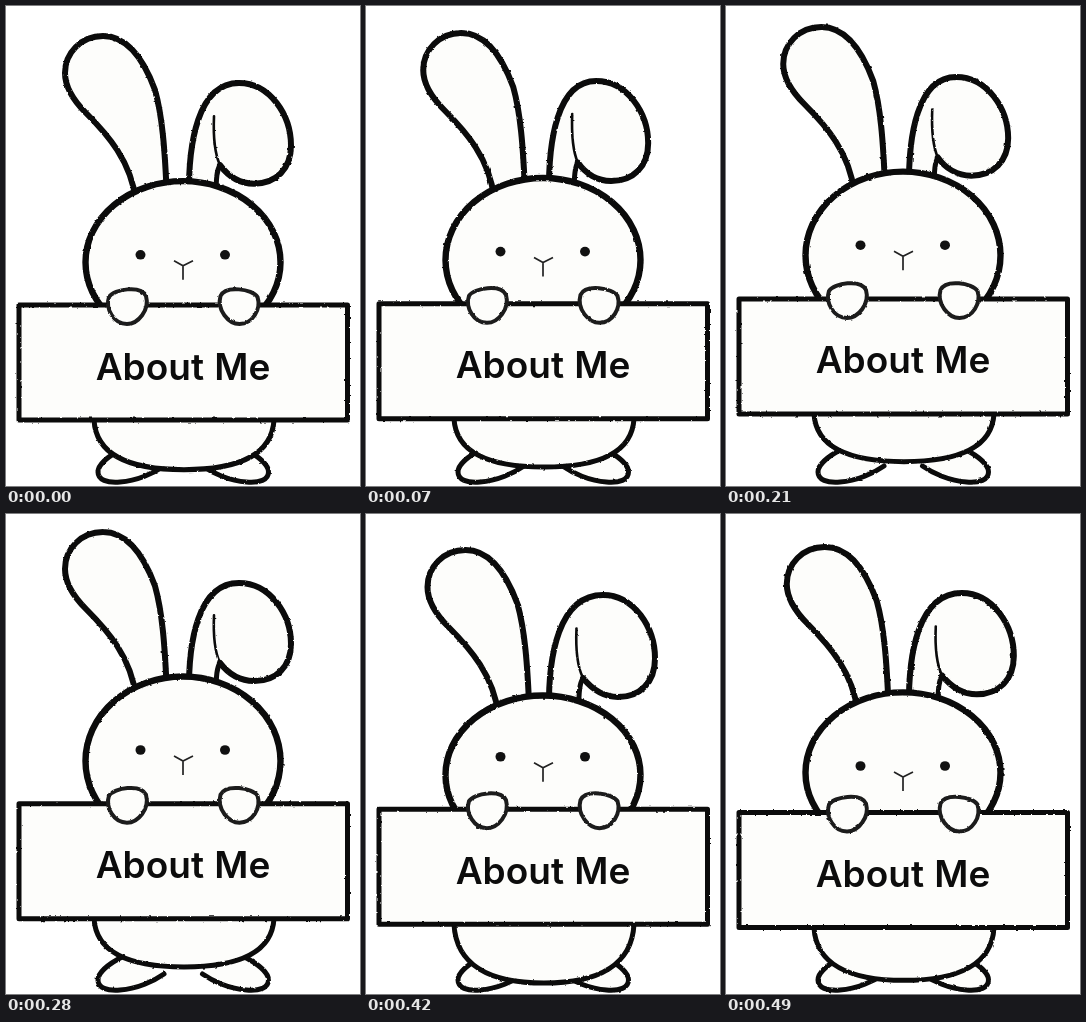
An HTML page that plays this animation: 354 by 480 pixels, repeating every 0.56 s.

```html
<!DOCTYPE html>
<html lang="en">
<head>
<meta charset="utf-8">
<title>About Me</title>
<style>
  html, body { margin: 0; width: 100%; height: 100%; overflow: hidden; background: #fff; }
  svg { display: block; width: 100vw; height: 100vh; }
  .ink { fill: #fdfdfb; stroke: #0b0b0b; stroke-width: 5; stroke-linecap: round; stroke-linejoin: round; }
  .line { fill: none; }
  .fill { stroke: none; }
  .ear { stroke-width: 6; }
  .head { stroke-width: 6.4; }
  .paw { stroke: #1c1c1c; stroke-width: 4; }
  .thin { stroke-width: 2.6; }
  .nose { fill: none; stroke: #222; stroke-width: 1.7; }
  .eye { fill: #111; }
  text { font: 600 37px Inter, sans-serif; word-spacing: 1px; fill: #0c0c0c; text-anchor: middle; }
</style>
</head>
<body>
<svg id="stage" viewBox="0 0 354 480"></svg>
<script>
const STEP = 70, COUNT = 8;
const stage = document.getElementById('stage');

// 0 at step `low`, rising to 1 at step `high`, then falling back
function swing(step, low, high, riseEase, fallEase) {
  const since = (step - low + COUNT) % COUNT;
  const rise = (high - low + COUNT) % COUNT;
  return since < rise
    ? (since / rise) ** riseEase
    : ((COUNT - since) / (COUNT - rise)) ** fallEase;
}

const path = (d, cls = '') => `<path class="${cls}" d="${d}"/>`;
const mirrored = shape => shape + `<g transform="matrix(-1 0 0 1 354.5 0)">${shape}</g>`;
const shifted = (x, y, shape) => `<g transform="translate(${x} ${y})">${shape}</g>`;

const leftEar = path(`M130 194 C125 154 102 128 80 106 C66 92 59 79 59 66 C59 46 75 29 97 29
  C121 29 138 53 149 83 C156 108 159 140 161 194`, 'ear');

function rightEar(top, bottom, sway) {
  const p = (x, y) => {
    const down = Math.min(1, (y - 74) / 103);
    const across = Math.min(1, (x - 183) / 40);
    return `${x + sway * across} ${y + top + (bottom - top) * down}`;
  };
  const rim = `M${p(183, 192)} C${p(182, 135)} ${p(192, 74)} ${p(233, 74)}
    C${p(264, 74)} ${p(285, 107)} ${p(285, 138)} C${p(285, 162)} ${p(270, 177)} ${p(248, 177)}
    C${p(234, 177)} ${p(222, 169)} ${p(214, 158)}`;
  const stem = `C${p(211, 163)} ${p(210, 170)} ${p(210, 192)}`;
  return path(rim + stem + 'Z', 'fill')
    + path(rim, 'line ear')
    + path(`M${p(214, 158)} C${p(209, 147)} ${p(207, 132)} ${p(208, 108)}`, 'line thin')
    + path(`M${p(214, 158)} ${stem}`, 'line');
}

function face(y) {
  const eye = x => `<ellipse class="eye" cx="${x}" cy="${y}" rx="5" ry="4.8"/>`;
  return eye(134.5) + eye(219)
    + path(`M168 ${y + 6} L177 ${y + 11} L187 ${y + 6} M177 ${y + 11} V${y + 25}`, 'nose');
}

function body(hem, bottom) {
  const bend = hem + (bottom - hem) * .7;
  return path(`M88 ${hem} C90 ${bend} 124 ${bottom} 178 ${bottom} S266 ${bend} 268 ${hem}`);
}

const foot = path('M118 442 C104 449 92 458 92 466 C92 474 101 477 114 476 C131 475 148 467 158 460');
const paw = path('M103 291 C108 283 135 279 140 290 C144 304 132 318 121 318 C108 318 99 303 103 291Z', 'paw');

// Charcoal edge, reseeded at each step
const rough = step => `<filter id="rough${step}" filterUnits="userSpaceOnUse" x="0" y="0" width="354" height="480"
    color-interpolation-filters="sRGB">
  <feTurbulence type="fractalNoise" baseFrequency=".3" numOctaves="1" seed="${step + 3}"/>
  <feDisplacementMap in="SourceGraphic" scale="2.5" xChannelSelector="R" yChannelSelector="G"/></filter>`;

function rabbit(step) {
  const stretch = swing(step, 6, 4, 1, .55);
  const sway = Math.cos((step - 6) * Math.PI / 4);
  const sign = 299 - 13 * swing(step, 0, 5, 1.5, 3);
  const eyes = 252 - 16 * swing(step, 7, 4, 1, .5);
  const headTop = 181.5 - 19 * stretch;
  const headY = 261 - 14 * stretch;
  return `${rough(step)}<g class="pose">
    <g class="ink" filter="url(#rough${step})">
      ${mirrored(foot)}
      ${body(sign + 115, 469 - 16 * stretch)}
      ${shifted(2.5 * sway, 7 - 18 * stretch, leftEar)}
      ${rightEar(7 - 12 * stretch, 6 - 16 * stretch, 4 * sway)}
      <ellipse class="head" cx="177" cy="${headY}" rx="97.5" ry="${headY - headTop}"/>
      <rect x="13" y="${sign}" width="328.5" height="115"/>
      ${shifted(0, sign - 299, mirrored(paw))}
    </g>
    ${face(eyes)}
    <text x="177" y="${sign + 74.5}">About Me</text>
  </g>`;
}

stage.innerHTML = Array.from({ length: COUNT }, (_, step) => rabbit(step)).join('');

stage.querySelectorAll('.pose').forEach((group, step) => group.animate([
  { opacity: 1, offset: 0, easing: 'step-end' },
  { opacity: 0, offset: 1 / COUNT },
  { opacity: 0, offset: 1 }
], { duration: STEP * COUNT, delay: (step - COUNT) * STEP, iterations: Infinity }));
</script>
</body>
</html>
```
